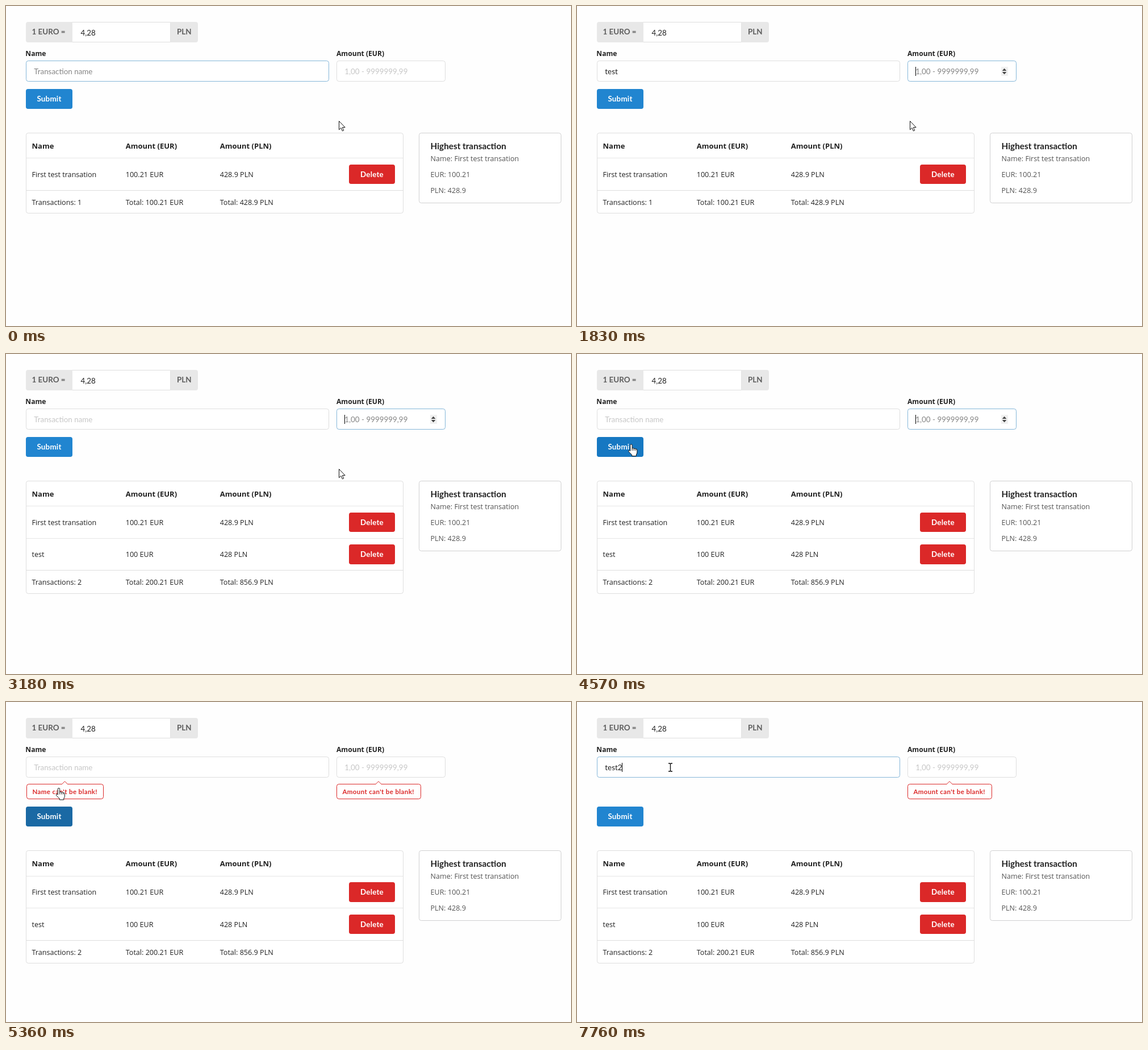
Animation of 995 by 563 pixels, one loop 8000 ms. Source, as an HTML page:

```html
<!DOCTYPE html>
<html lang="en">
<head>
<meta charset="utf-8">
<title>Transactions</title>
<style>
  html, body { margin: 0; width: 100%; height: 100%; overflow: hidden; background: #fefefe; }
  svg { display: block; font: 13.4px Lato, "Open Sans", sans-serif; }
  text { fill: rgba(0,0,0,.87); white-space: pre; }
  .label, .head, .cell, .meta { font-family: "Open Sans", "Noto Sans", sans-serif; }
  .label { font-weight: 700; font-size: 12.1px; }
  .head { font-weight: 700; font-size: 13px; }
  .cell, .meta { font-size: 12.6px; }
  .meta { fill: rgba(0,0,0,.68); }
  .tag { font-weight: 700; fill: rgba(0,0,0,.6); }
  .btn { font-weight: 700; fill: #fff; text-anchor: middle; letter-spacing: .2px; }
  .title { font-weight: 700; font-size: 15.3px; }
  .err { font-weight: 700; font-size: 11.5px; fill: #db2828; letter-spacing: .38px; }
  .hint { fill: #c7c7c7; }
  .hint.on { fill: #858585; }
</style>
</head>
<body>
<svg id="stage" width="995" height="563" viewBox="0 0 995 563"></svg>
<script>
const LOOP = 8000, RATE = 4.28, SHIFT = 38.4, ROW = 56.6;
const BLUE = '#2185d0', HOVER = '#1678c2', DOWN = '#1a69a4', FOCUS = '#0d71bb', RED = '#db2828';
const LINE = '#dedede', SOFT = '#e6e6e6';

// [start in ms, what changes from then on]
const steps = [
  [0, { focus: 'name', caret: 0, name: '', amount: '', rows: 1, errName: 0, errAmount: 0,
        open: 0, btn: BLUE, cur: ['arrow', 586.5, 202.5] }],
  [150, { caret: 1 }],
  [580, { caret: 0 }],
  [880, { caret: 1, name: 't' }],
  [1010, { name: 'te' }],
  [1150, { name: 'test' }],
  [1680, { caret: 0 }],
  [1830, { caret: 1, focus: 'amount' }],
  [2230, { caret: 0 }],
  [2460, { caret: 1, amount: '1' }],
  [2600, { amount: '10' }],
  [2760, { amount: '100' }],
  [3180, { name: '', amount: '', rows: 2 }],
  [3680, { caret: 0 }],
  [4150, { caret: 1 }],
  [4290, { cur: ['arrow', 430, 190] }],
  [4430, { cur: ['arrow', 200, 168] }],
  [4570, { cur: ['hand', 95.5, 159], btn: HOVER }],
  [4720, { cur: ['hand', 90, 158], caret: 0 }],
  [4860, { cur: ['hand', 90, 155] }],
  [4990, { cur: ['hand', 93, 151.5] }],
  [5110, { caret: 1 }],
  [5230, { focus: '', caret: 0, btn: DOWN }],
  [5360, { open: 1, errName: 1, errAmount: 1 }],
  [5510, { btn: FOCUS, cur: ['beam', 98, 152] }],
  [5660, { cur: ['beam', 118, 138] }],
  [5810, { cur: ['beam', 140, 122] }],
  [5950, { cur: ['beam', 156, 115] }],
  [6090, { focus: 'name', caret: 1, btn: BLUE, cur: ['beam', 157, 115] }],
  [6240, { cur: ['beam', 164.5, 115] }],
  [6550, { caret: 0 }],
  [7010, { caret: 1, name: 't', errName: 0 }],
  [7150, { name: 'tes' }],
  [7290, { name: 'test' }],
  [7760, { name: 'test2' }]
];
let last = {};
const states = steps.map(([at, change]) => ({ at, ...(last = { ...last, ...change }) }));

const data = [['First test transation', 100.21], ['test', 100]];
const money = v => String(+v.toFixed(2));

const pen = document.createElement('canvas').getContext('2d');
pen.font = '13.4px Lato, "Open Sans", sans-serif';

// Layout positions are fractional; lines and boxes land on whole pixels.
const snap = y => Math.floor(y) + .5;
const text = (x, y, s, cls = '') => `<text x="${x}" y="${Math.round(y)}" class="${cls}">${s}</text>`;
const rect = (x, y, w, h, fill, stroke = 'none', r = 3.8) =>
  `<rect x="${x}" y="${y}" width="${w}" height="${h}" rx="${r}" fill="${fill}" stroke="${stroke}"/>`;
const path = (d, fill, stroke = 'none', more = '') =>
  `<path d="${d}" fill="${fill}" stroke="${stroke}" ${more}/>`;
const panel = (x, top, w, bottom, stroke) =>
  rect(x, snap(top), w, snap(bottom) - snap(top), '#fff', stroke);
const rule = (y, color) => path(`M36 ${snap(y)}H699`, 'none', color);

function button(x, y, w, label, color) {
  const top = Math.round(y);
  return rect(x, top, w, Math.round(y + 34.5) - top, color) + text(x + w / 2, top + 22, label, 'btn');
}

function field(x, w, value, hint, on, caret) {
  const left = x + 13.8;
  let out = rect(x, 96.5, w, 36, '#fff', on ? '#85b7d9' : LINE);
  out += value ? text(left, 120, value) : text(left, 120, hint, on ? 'hint on' : 'hint');
  if (on && caret) {
    const cx = Math.round(left + pen.measureText(value).width - .5);
    out += rect(cx, 107, 1, 16, '#000', 'none', 0);
  }
  return out;
}

function rateRow() {
  return path('M117 28H39a4 4 0 0 0-4 4V60a4 4 0 0 0 4 4H117Z', '#e8e8e8')
    + path('M117 28.5H289.5V63.5H117', '#fff', LINE)
    + path('M289.5 28H334a4 4 0 0 1 4 4V60a4 4 0 0 1-4 4H289.5Z', '#e8e8e8')
    + text(45.5, 50, '1 EURO =', 'tag') + text(131.5, 52, '4,28') + text(301, 50, 'PLN', 'tag');
}

const spinner = rect(747, 107, 12, 16, '#f0f0f0', 'none', 0)
  + path('M748.8 114L752.6 109.8 756.4 114ZM748.8 116L752.6 120.2 756.4 116Z', '#444');

function error(x, w, tip, msg) {
  return rect(x, 144.5, w, 26, '#fff', RED)
    + path(`M${tip - 5.4} 145L${tip} 139.6 ${tip + 5.4} 145`, '#fff', RED)
    + path(`M${tip - 4.4} 145.5H${tip + 4.4}`, 'none', '#fff')
    + text(x + 10, 162, msg, 'err');
}

function table(n, dy) {
  const rows = data.slice(0, n), top = 267.6 + dy, end = top + ROW * n;
  const cells = (y, list, cls) => list.map((s, i) => text([45.5, 210.7, 376.7][i], y, s, cls)).join('');
  const sum = rows.reduce((a, r) => a + r[1], 0);
  let out = panel(35.5, 223.3 + dy, 664, end + 40.5, LINE)
    + cells(250.7 + dy, ['Name', 'Amount (EUR)', 'Amount (PLN)'], 'head') + rule(top, SOFT);
  rows.forEach(([name, eur], i) => {
    const y = top + ROW * i;
    if (i) out += rule(y, SOFT);
    out += cells(y + 33, [name, money(eur) + ' EUR', money(eur * RATE) + ' PLN'], 'cell')
      + button(604, y + 11.2, 81, 'Delete', RED);
  });
  const totals = ['Transactions: ' + n, `Total: ${money(sum)} EUR`, `Total: ${money(sum * RATE)} PLN`];
  return out + rule(end, LINE) + cells(end + 25.5, totals, 'cell');
}

function card(dy) {
  const [name, eur] = data[0];
  return panel(727.5, 223.3 + dy, 250, 346.3 + dy, '#d0d0d1')
    + text(747.5, 251.7 + dy, 'Highest transaction', 'title')
    + text(747.5, 272.6 + dy, 'Name: ' + name, 'meta')
    + text(747.5, 300.8 + dy, 'EUR: ' + money(eur), 'meta')
    + text(747.5, 329 + dy, 'PLN: ' + money(eur * RATE), 'meta');
}

const cursors = {
  arrow: path('M0 0V15.2L3.5 11.9 5.9 17.4 8.2 16.4 5.9 11H10.6Z', '#fff', '#111', 'stroke-linejoin="round"'),
  hand: path('M-1.7 1.7a1.7 1.7 0 0 1 3.4 0V7q2-1 3.1.5q2-.8 3 .6q2.6-.4 2.6 2V14q0 2-1.6 4V20.5H1.2V18.4'
    + 'L-4.4 12.8q-.8-2 .9-2.4q1 0 1.8 1.2Z', '#fff', '#111', 'stroke-linejoin="round"')
    + path('M1.7 7V11M4.8 7.8V11M7.8 8.5V11', 'none', '#111'),
  beam: path('M-3.5-7H-1L0-6 1-7H3.5M0-6V6M-3.5 7H-1L0 6 1 7H3.5', 'none', '#111', 'stroke-width="1.4"')
};

function draw(s) {
  const onName = s.focus === 'name', onAmount = s.focus === 'amount', dy = s.open ? SHIFT : 0;
  const [kind, x, y] = s.cur;
  return rateRow()
    + text(34.3, 88, 'Name', 'label') + text(582, 88, 'Amount (EUR)', 'label')
    + field(35.5, 533, s.name, 'Transaction name', onName, s.caret)
    + field(582.5, 191, s.amount, '1,00 - 9999999,99', onAmount, s.caret)
    + (onAmount ? spinner : '')
    + (s.errName ? error(36.5, 135, 103.5, "Name can't be blank!") : '')
    + (s.errAmount ? error(582.5, 148, 656, "Amount can't be blank!") : '')
    + button(35, 146 + dy, 82, 'Submit', s.btn)
    + table(s.rows, dy) + card(dy)
    + `<g transform="translate(${x} ${y})">${cursors[kind]}</g>`;
}

const stage = document.getElementById('stage');
const start = performance.now();
let shown = null;

function tick() {
  const t = (performance.now() - start) % LOOP;
  const now = states.findLast(s => s.at <= t) || states[0];
  if (now !== shown) {
    shown = now;
    stage.innerHTML = draw(now);
  }
  requestAnimationFrame(tick);
}
tick();
</script>
</body>
</html>
```
